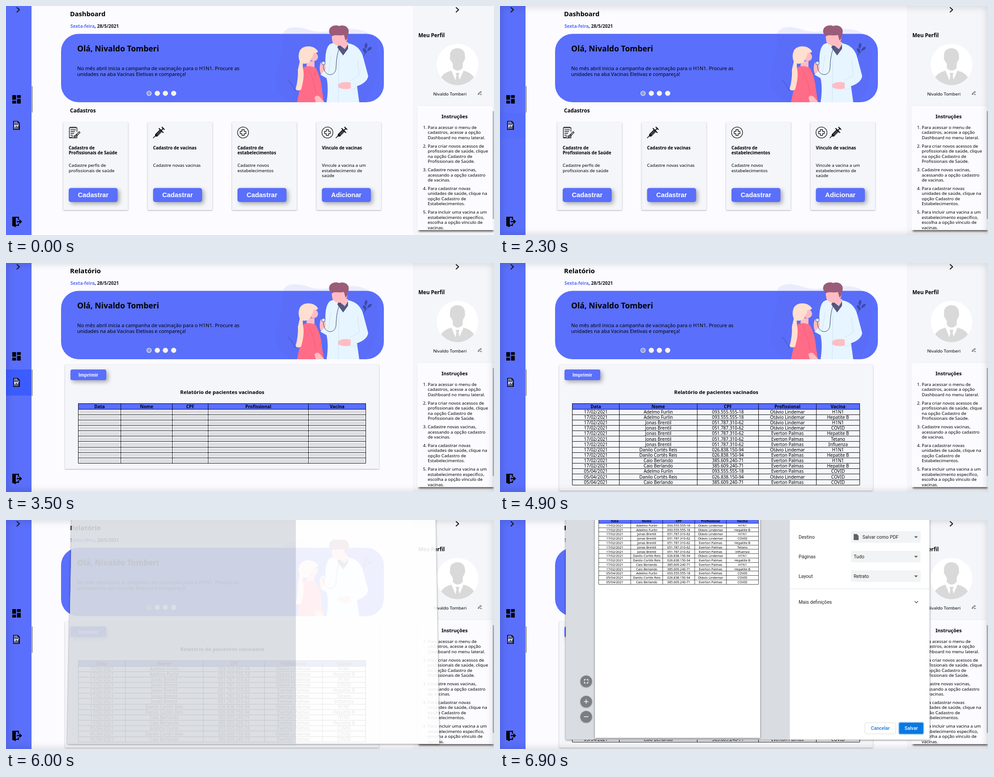
Animation, 1090 px wide and 514 px high, one loop 8000 ms. Source, as an HTML page:

```html
<!DOCTYPE html>
<html lang="pt">
<head>
<meta charset="utf-8">
<title>Dashboard</title>
<style>
  html, body { margin: 0; width: 100%; height: 100%; overflow: hidden; background: #fcfbff; }
  svg { display: block; width: 1090px; height: 514px; font-family: "Noto Sans", sans-serif; }
  .b { font-weight: 700; }
  .m { text-anchor: middle; }
  .arial { font-family: "Liberation Sans", Arial, sans-serif; font-weight: 700; fill: #fff; }
  .ui { font-family: Roboto, sans-serif; fill: #202124; }
  .card { fill: #f5f6fa; filter: drop-shadow(0 1.5px 1.5px rgba(0, 0, 0, .32)); }
  .btn { filter: drop-shadow(4px 4px 5px rgba(0, 0, 0, .32)); }
  .line { fill: none; stroke: #111; stroke-width: 1.3; stroke-linecap: round; stroke-linejoin: round; }
</style>
</head>
<body>
<script>
const BLUE = '#5a6ffb', LOOP = 8000;

const text = (x, y, s, size = 9.75, cls = '', attrs = '') =>
  `<text x="${x}" y="${y}" font-size="${size}" class="${cls}" ${attrs}>${s}</text>`;
const lines = (x, y, list, size, cls, step = 11.5) =>
  list.map((s, i) => text(x, y + i * step, s, size, cls)).join('');
const rect = (x, y, w, h, fill, attrs = '') =>
  `<rect x="${x}" y="${y}" width="${w}" height="${h}" fill="${fill}" ${attrs}/>`;
const circle = (x, y, r, fill, attrs = '') =>
  `<circle cx="${x}" cy="${y}" r="${r}" fill="${fill}" ${attrs}/>`;
const path = (d, fill, attrs = '') => `<path d="${d}" fill="${fill}" ${attrs}/>`;
const line = (d, attrs = '') => `<path class="line" d="${d}" ${attrs}/>`;
const at = (x, y, s) => `<g transform="translate(${x} ${y})">${s}</g>`;
const group = (id, s) => `<g id="${id}">${s}</g>`;

// Report data
const people = [['Adelmo Furlin', '093.555.555-18'], ['Jonas Brentil', '051.787.310-62'],
  ['Danilo Cortês Reis', '026.838.150-94'], ['Caio Berlando', '385.609.240-71']];
const staff = ['Otávio Lindemar', 'Everton Palmas'];
const vaccines = { H: 'H1N1', B: 'Hepatite B', C: 'COVID', T: 'Tetano', I: 'Influenza' };
const headers = ['Data', 'Nome', 'CPF', 'Profissional', 'Vacina'];
const rows = [...'00111112233023'].map((p, i) => [
  i < 11 ? '17/02/2021' : '05/04/2021', ...people[p],
  staff['00001110111101'[i]], vaccines['HBHCBTIHBHBCCC'[i]]]);

function table(cols, top, rowH, body, size) {
  const count = body.length + 1, bottom = top + rowH * count, right = cols[5];
  let grid = '';
  for (let i = 0; i <= count; i++) grid += `M${cols[0]} ${Math.floor(top + i * rowH) + .5}H${right}`;
  for (const x of cols) grid += `M${x} ${Math.floor(top)}V${bottom}`;
  const cells = [headers, ...body].map((row, r) => row.map((s, c) => {
    const mid = (cols[c] + cols[c + 1]) / 2, y = top + (r + .5) * rowH;
    return s ? text(mid, y + size * .37, s, size, r ? 'm' : 'b m')
      : rect(cols[c] + 2, y - 3.6, cols[c + 1] - cols[c] - 4, 7.6, '#dcdde1', 'rx="1" class="bone"');
  }).join('')).join('');
  return rect(cols[0], top, right - cols[0], rowH, BLUE) + cells +
    `<path d="${grid}" fill="none" stroke="#000" stroke-width="${size / 10}"/>`;
}

// Icons
const chevron = x => line(`M${x} 3.5l5.5 5-5.5 5`, 'style="stroke-width:2"');
const cross = circle(13, 13, 12.3, 'none', 'stroke="#111" stroke-width="1.3"') +
  line('M10.5 6.5h5v4h4v5h-4v4h-5v-4h-4v-5h4z');
const syringe = line('M1 25l6-6', 'style="stroke-width:1.6"') +
  path('M5 17L16 6l5 5L10 22H5z', '#111') +
  line('M9 17l8-8M11 19l8-8', 'style="stroke:#f5f6fa;stroke-width:.8"') +
  line('M14 4l9 9M18.5 8.5l5-5M20.5 1l5 5', 'style="stroke-width:2.2"');
const notes = line('M2 2h17v9M19 18v7H2zM2 2v23') +
  line('M5 0v3M8.5 0v3M12 0v3M15.5 0v3M5 7h11M5 11h9M5 15h7M5 19h4M24 11l2 2-9 9-4 2 2-4z');
const sideIcons =
  [[14, 200, 10.5], [24.5, 200, 6.5], [14, 212.5, 6.5], [24.5, 208.5, 10.5]]
    .map(([x, y, h]) => rect(x, y, 8.5, h, '#050505')).join('') +
  at(16, 258, path('M.9 .9H10L14.1 5V19.1H.9z', '#c3caff', 'stroke="#050505" stroke-width="1.8"') +
    path('M9.5 0L15 5.5H9.5z', '#050505') +
    '<path d="M2.5 4.500h6M2.5 7.500h10M4 18v-4M7 18v-7M10 18v-5M12.500 18v-8" stroke="#050505" stroke-width="1.500"/>') +
  at(13, 472, path('M1 1H16V8H13.5V3.5H9V19H13.5V16H16V21.5H9V24.5L1 21.5z', '#050505') +
    path('M11 10.5h6v-4l6 5.5-6 5.5v-4h-6z', '#050505'));

// Banner illustration
const SKIN = '#ffbdc3', PEACH = '#ffdfcf', COAT = '#e6f5ff';
const blob = path('M617 66C624 42 652 46 672 52C698 62 716 58 748 52C790 48 824 58 836 92Z', '#eaecfd');
const leaf = (x, y, turn) =>
  `<ellipse rx="3" ry="6" transform="translate(${x} ${y}) rotate(${turn})" fill="#3c4baa"/>`;
const illustration =
  leaf(804, 89, 10) + leaf(812, 96, 50) + leaf(801, 100, -30) +
  line('M793 122Q802 110 805 92M800 110L812 96M630 166Q640 176 646 190', 'style="stroke:#3c4baa;stroke-width:1"') +
  // patient
  circle(687, 114, 10, SKIN) + path('M672 124h17v15l-8 6-10-6z', SKIN) +
  path('M661 139Q676 131 692 139Q704 160 706 190L710 216H650Q655 190 661 169Z', '#ff6c87') +
  path('M655 104C659 87 688 86 697 102C693 108 688 104 686 106C687 114 681 116 680 123C676 130 662 132 657 126C653 119 653 110 655 104Z', PEACH) +
  path('M657 121Q664 123 663 138Q668 158 659 188Q650 192 647 186Q653 164 652 143Z', PEACH) +
  path('M689 205Q695 198 701 204L711 216H692Z', SKIN) +
  line('M676 143Q690 170 692 197', 'style="stroke:#e85676;stroke-width:.7"') +
  // doctor
  path('M703 127Q711 123 718 132V150Q708 157 702 150Q699 137 703 127Z', SKIN) +
  path('M723 86Q743 75 766 84Q789 89 797 112L809 157Q807 172 784 180L789 216H716Q721 184 716 162L702 154Q708 150 714 142C712 115 714 94 723 86Z', COAT) +
  path('M744 77L764 81L762 99L749 103Z', SKIN) +
  path('M743 86L757 97L764 86V96L753 111L740 93Z', '#515a83') +
  path('M726 59Q745 54 764 62Q764 81 752 88Q735 92 729 80Z', SKIN) +
  path('M722 60C719 45 736 41 744 45C758 40 768 50 765 61C764 68 763 75 758 77L755 65C744 68 731 63 728 69Z', '#9a5c79') +
  path('M741 176Q752 168 770 172L770 185Q756 189 742 183Z', SKIN) +
  line('M785 121L789 155L770 167M744 107L742 216M726 111L720 150M770 188L785 184', 'style="stroke:#c9deef;stroke-width:.8"') +
  line('M709 132C708 158 734 161 737 141C738 119 740 102 747 90', 'style="stroke:#343b5e;stroke-width:1"') +
  circle(709, 128, 4, '#dbe8ff', 'stroke="#515a83"');

const dots = [319.5, 338, 356, 374.5].map((x, i) =>
  circle(x, 196, i ? 5.8 : 5, i ? '#fbf3ec' : '#8f9de3', i ? '' : 'stroke="#f3eef0" stroke-width="1.2"')).join('');

const banner = blob + rect(123, 62.5, 721, 153.5, BLUE, 'rx="39"') +
  path('M604 170C600 130 625 110 618 64H820C842 110 828 190 800 216H640C615 205 606 190 604 170Z', '#556af4', 'opacity=".25"') +
  illustration + text(159, 101.5, 'Olá, Nivaldo Tomberi', 17.5, 'b') +
  lines(159, 143.7, ['No mês abril inicia a campanha de vacinação para o H1N1. Procure as',
    'unidades na aba Vacinas Eletivas e compareça!'], 11.1, '', 13) + dots;

// Right panel
const steps = [
  [275.8, ['Para acessar o menu de', 'cadastros, acesse a opção', 'Dashboard no menu lateral.']],
  [317.5, ['Para criar novos acessos de', 'profissionais de saúde, clique', 'na opção Cadastro de', 'Profissionais de Saúde.']],
  [371, ['Cadastre novas vacinas,', 'acessando a opção cadastro', 'de vacinas.']],
  [412.5, ['Para cadastrar novas', 'unidades de saúde, clique na', 'opção Cadastro de', 'Estabelecimentos.']],
  [466, ['Para incluir uma vacina a um', 'estabelecimento específico,', 'escolha a opção vínculo de', 'vacinas.']]];
const avatar = circle(1008.5, 131.5, 46.5, '#fff') +
  path('M992 112C989 90 1026 88 1025 112C1027 121 1022 122 1020 130V139Q1009 151 998 139V130C994 122 990 121 992 112Z', '#d9d9d9') +
  path('M972 160Q977 150 995 145L1008 177L1022 145Q1040 150 1045 160A46.5 46.5 0 0 1 972 160Z', '#d9d9d9') +
  path('M1004 150h9l-2 6 3 14-5.5 8-5.5-8 3-14z', '#d9d9d9');
const profile = rect(909, 0, 181, 514, '#f5f6fa') + chevron(1005.5) +
  text(921, 69.7, 'Meu Perfil', 11.5, 'b') + avatar + text(991.5, 200.5, 'Nivaldo Tomberi', 9.7, 'm') +
  line('M1054.5 198.5l1-3 5-4 1.5 1.8-5 4zM1059 198.8h3.5', 'style="stroke-width:.9"') +
  rect(919, 224, 167, 279, '#fcfbff', 'style="filter:drop-shadow(3px 3px 2px rgba(0,0,0,.65))"') +
  rect(1086, 224, 4, 279, '#f5f6fa') + rect(1087, 236, 3, 242, '#b9bac0') +
  text(1002, 251.5, 'Instruções', 11, 'b m') +
  steps.map(([y, s], i) => text(931.5, y, i + 1 + '.') + lines(942, y, s)).join('');

// Dashboard cards
const cards = [
  [notes, ['Cadastro de', 'Profissionais de Saúde'], ['Cadastre perfis de', 'profissionais de saúde'], 'Cadastrar'],
  [syringe, ['Cadastro de vacinas'], ['Cadastre novas vacinas'], 'Cadastrar'],
  [cross, ['Cadastro de', 'estabelecimentos'], ['Cadastre novos', 'estabelecimentos'], 'Cadastrar'],
  [cross + at(31, 0, syringe), ['Vínculo de vacinas'], ['Vincule a vacina a um', 'estabelecimento de', 'saúde'], 'Adicionar']];
const dashboard = text(143, 22.7, 'Dashboard', 14.6, 'b') + text(143, 238.7, 'Cadastros', 11.6, 'b') +
  cards.map(([icon, title, info, label], i) => at(128 + i * 188.5, 261,
    rect(0, 0, 144.5, 197, '', 'class="card"') + at(11.5, 10, icon) +
    lines(12, 60.7, title, 9.75, 'b') + lines(12, 100, info) +
    rect(12, 147.5, 109.5, 31.5, BLUE, 'rx="5" class="btn"') +
    text(66.7, 168.3, label, 14.7, 'arial m'))).join('');

// Report page
const reportCard = h => rect(132, 228, 701, h, '', 'class="card"');
const report = text(143, 22.7, 'Relatório', 15, 'b') +
  group('waiting', reportCard(234) + rect(161, 315, 643, 134, '#f9fafd') +
    table([161.5, 256.5, 371.5, 451.5, 675.5, 803.5], 315.9, 12.15, Array(10).fill(Array(5).fill('')), 9.9)) +
  group('loaded', reportCard(283) + table([161.5, 266.5, 440.5, 577.5, 706.5, 803.5], 315.9, 12.15, rows, 9.95)) +
  rect(144, 239, 80, 24, BLUE, 'rx="4" class="btn" id="print"') + text(184, 255, 'Imprimir', 11, 'arial m') +
  text(483, 293.7, 'Relatório de pacientes vacinados', 11.45, 'b m');

// Print dialog
const fields = [['Destino', 'Salvar como PDF'], ['Páginas', 'Tudo'], ['Layout', 'Retrato']].map(([name, value], i) => at(0, 25 + i * 44,
  text(667, 17, name, 10.6, 'ui') + rect(784, 0, 155.5, 26, '#f1f3f4', 'rx="2"') +
  text(i ? 790 : 809.5, 17, value, 10.6, 'ui') + path('M925 11.5h8.5l-4.25 4.3z', '#5f6368'))).join('');
const settings = fields + path('M790 31.5h7l4 4v9.5h-11z', '#5f6368') + rect(648, 154, 311, 1, '#dfe1e4') +
  text(667, 188.3, 'Mais definições', 10.6, 'ui') +
  line('M926.5 182.5l3.5 3.5 3.5-3.5', 'style="stroke:#4b4f54;stroke-width:1.4"') +
  rect(815, 455, 69, 25, '#fff', 'rx="3" stroke="#dadce0"') +
  text(849.5, 471.2, 'Cancelar', 10.6, 'ui m', 'style="fill:#0b7be5;font-weight:500"') +
  rect(890.5, 454, 56, 27, '#0879e3', 'rx="3.5" stroke="#a9d0f5" stroke-width="2"') +
  text(918.5, 471.2, 'Salvar', 10.6, 'ui m', 'style="fill:#fff;font-weight:500"');
const sheet = rect(212, -10, 369, 499, '#fff', 'style="filter:drop-shadow(0 1px 2px rgba(0,0,0,.5))"') +
  table([220.5, 292, 363.5, 435, 505.5, 577.5], -2.4, 9.77, rows, 7.2);
const zoom = [
  [362, 'M-4-1.5v-2.5h2.5M1.5-4h2.5v2.5M4 1.5v2.5h-2.5M-1.5 4h-2.5v-2.5'],
  [407.5, 'M-4.5 0h9M0-4.5v9'],
  [441.5, 'M-4.5 0h9']
].map(([y, d]) => at(192.5, y,
  circle(0, 0, 13, '#7b7f85', 'style="filter:drop-shadow(0 1px 1px rgba(0,0,0,.4))"') +
  line(d, 'style="stroke:#fff"'))).join('');
const dialog = group('dialog',
  '<g style="filter:drop-shadow(0 1px 2px rgba(0,0,0,.5))"><path id="pane" fill="#fff"/><path id="preview" fill="#d9dce1"/></g>' +
  group('settings', settings) + group('sheet', sheet) + group('zoom', zoom));

document.body.innerHTML = '<svg viewBox="0 0 1090 514">' +
  rect(0, 0, 1090, 514, '#fcfbff') + rect(0, 0, 57, 514, BLUE) +
  rect(0, 239, 57, 58.5, '#3c5cff', 'id="hover"') + rect(58, 180, 1, 59, '#333', 'id="marker"') +
  chevron(24.5) + sideIcons + banner +
  text(144, 49.3, `<tspan fill="${BLUE}">Sexta-feira</tspan>, 28/5/2021`, 10.05, 'b', 'fill="#161616"') +
  profile + group('dashboard', dashboard) + group('report', report) +
  rect(-6, -6, 1102, 526, 'none', 'id="vignette" stroke="#000" stroke-width="22" opacity=".1" style="filter:blur(7px)"') +
  dialog + '</svg>';

const $ = id => document.getElementById(id);
const show = (id, on) => $(id).style.display = on ? '' : 'none';
const bones = document.querySelectorAll('.bone');

// Linear interpolation through [time, value] points
function track(t, points) {
  const i = points.findIndex(p => t < p[0]);
  if (i < 0) return points[points.length - 1][1];
  if (!i) return points[0][1];
  const [[t0, a], [t1, b]] = [points[i - 1], points[i]];
  return a + (b - a) * (t - t0) / (t1 - t0);
}

function draw(now) {
  const t = Math.floor(now % LOOP / 100) * 100;
  const reportOn = t >= 3200, loaded = t >= 3800;
  show('vignette', t >= 100);
  $('hover').style.opacity = track(t, [[2200, 0], [2300, .15], [2500, 1], [4800, 1], [4900, 0]]);
  $('marker').setAttribute('y', reportOn ? 239 : 180);
  show('dashboard', !reportOn);
  show('report', reportOn);
  show('waiting', !loaded);
  show('loaded', loaded);
  const pulse = .85 + .15 * Math.cos((t - 3500) / 1500 * 2 * Math.PI);
  bones.forEach(b => b.style.opacity = pulse);
  $('print').setAttribute('fill', t >= 5000 ? '#4f68ff' : BLUE);

  // The dialog swings in with its lower edge nearer to the viewer
  const tilt = track(t, [[5900, 1], [6000, .28], [6200, 0]]);
  const bottom = 493 + 34 * tilt, left = 147 - 35 * tilt, right = 959.5 + 30 * tilt;
  show('dialog', t >= 5700);
  $('dialog').style.opacity = track(t, [[5700, .01], [5800, .04], [5900, .1], [6000, .9], [6100, 1]]);
  $('pane').setAttribute('d', `M147-9H959.5V0L${right} ${bottom}H${left}L147 0Z`);
  $('preview').setAttribute('d', `M147-9H647.5V${bottom}H${left}L147 0Z`);
  show('preview', t >= 6000);
  show('settings', t >= 6300);
  show('sheet', t >= 6800);
  show('zoom', t >= 6900);
}

const start = performance.now();
(function tick() {
  draw(performance.now() - start);
  requestAnimationFrame(tick);
})();
</script>
</body>
</html>
```
